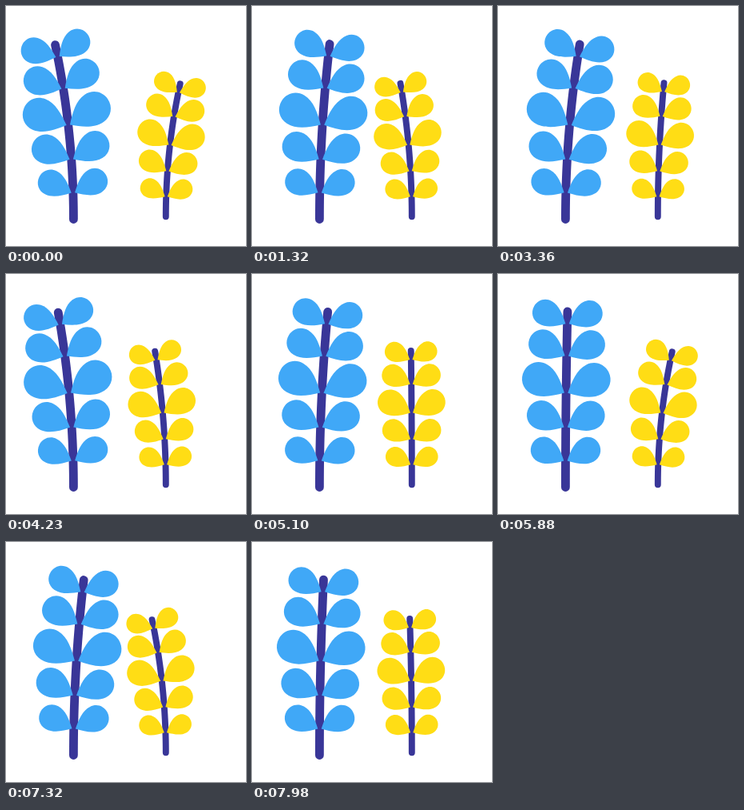
These frames come from a looping animation (300x300 px, 8000 ms). An HTML page with a canvas:

```html
<!DOCTYPE html>
<html lang="en">
<head>
<meta charset="utf-8">
<title>Swaying plants</title>
<style>
  html, body { margin: 0; width: 100%; height: 100%; overflow: hidden; background: #fff; }
  canvas { display: block; width: 100%; height: 100%; }
</style>
</head>
<body>
<canvas id="stage"></canvas>
<script>
const SIZE = 300, LOOP = 8000;
const STEM = '#393698';
const LEAF_TILT = 28 * Math.PI / 180;

// Each leaf pair is [y of the joint, leaf length] on the upright plant.
const plants = [
  {
    x: 84.4, base: 266.5, top: 47, width: 10.8, color: '#40a8f7',
    sway: -23, period: 2160,
    pairs: [[62.2, 45], [102.4, 49.3], [148.6, 57.3], [191.6, 50.3], [233.4, 44.8]]
  },
  {
    x: 199.8, base: 263.2, top: 96, width: 7.9, color: '#ffdd15',
    sway: 18, period: 2940,
    pairs: [[107, 33.7], [137.8, 38], [173.5, 44], [206.4, 38], [238.3, 33.7]]
  }
];

const canvas = document.getElementById('stage');
const ctx = canvas.getContext('2d');
const ratio = window.devicePixelRatio || 1;
canvas.width = canvas.height = SIZE * ratio;

// Linear back and forth: 1 at the start of a period, -1 halfway.
function triangle(t, period) {
  const p = (t % period) / period;
  return Math.abs(p - 0.5) * 4 - 1;
}

// Point on the bent centre line, h above the base, with its lean angle.
function along(plant, bend, h) {
  const angle = bend * h;
  const flat = Math.abs(bend) < 1e-7;
  return {
    x: plant.x + (flat ? 0 : (1 - Math.cos(angle)) / bend),
    y: plant.base - (flat ? h : Math.sin(angle) / bend),
    angle
  };
}

function drawStem(plant, bend) {
  const height = plant.base - plant.top, steps = 40;
  ctx.beginPath();
  for (let i = 0; i <= steps; i++) {
    const p = along(plant, bend, height * i / steps);
    ctx.lineTo(p.x, p.y);
  }
  ctx.lineWidth = plant.width;
  ctx.lineCap = ctx.lineJoin = 'round';
  ctx.strokeStyle = STEM;
  ctx.stroke();
}

function drawLeaf(joint, side, length, gap) {
  const w = 0.362;
  ctx.save();
  ctx.translate(joint.x, joint.y);
  ctx.rotate(joint.angle);
  ctx.scale(side, 1);
  ctx.translate(gap, 0);
  ctx.rotate(-LEAF_TILT);
  ctx.scale(length, length);
  ctx.beginPath();
  ctx.moveTo(0, 0);
  ctx.bezierCurveTo(0.2, -0.19, 0.4, -w, 0.64, -w);
  ctx.bezierCurveTo(0.85, -w, 1, -0.2, 1, 0);
  ctx.bezierCurveTo(1, 0.2, 0.85, w, 0.64, w);
  ctx.bezierCurveTo(0.4, w, 0.2, 0.19, 0, 0);
  ctx.fill();
  ctx.restore();
}

function drawPlant(plant, t) {
  const height = plant.base - plant.top;
  const bend = 2 * plant.sway * triangle(t, plant.period) / (height * height);
  drawStem(plant, bend);
  ctx.fillStyle = plant.color;
  for (const [y, length] of plant.pairs) {
    const joint = along(plant, bend, plant.base - y);
    for (const side of [-1, 1]) drawLeaf(joint, side, length, plant.width * 0.2);
  }
}

function frame() {
  const t = performance.now() % LOOP;
  ctx.setTransform(ratio, 0, 0, ratio, 0, 0);
  ctx.fillStyle = '#fff';
  ctx.fillRect(0, 0, SIZE, SIZE);
  for (const plant of plants) drawPlant(plant, t);
  requestAnimationFrame(frame);
}
frame();
</script>
</body>
</html>
```
